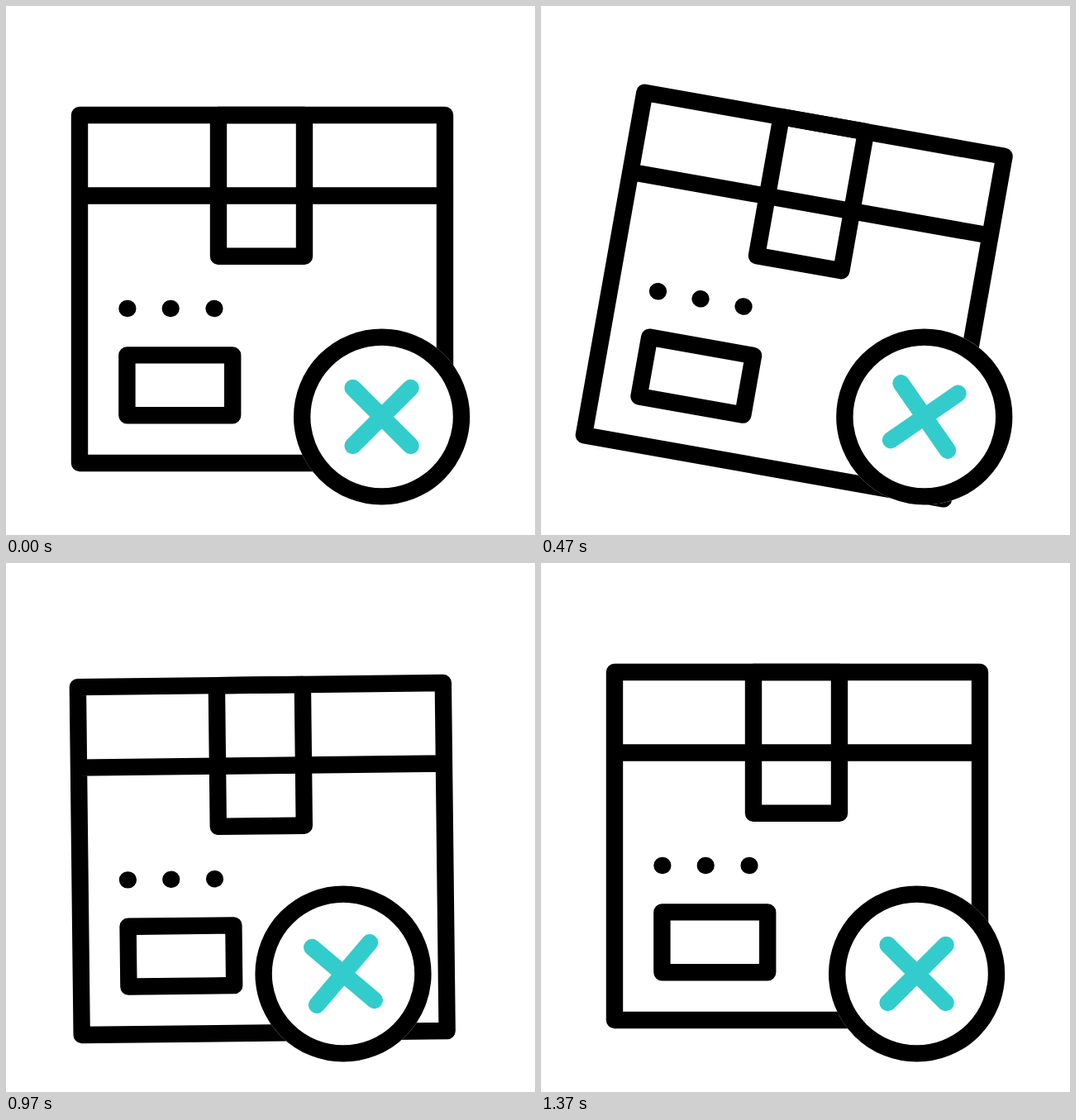
Recreate the animation shown at these times as an HTML page. Size 640 by 640 pixels, loop 1670 ms.

```html
<!DOCTYPE html>
<html lang="en">
<head>
<meta charset="utf-8">
<title>Cancelled parcel</title>
<style>
  html, body { margin: 0; width: 100%; height: 100%; overflow: hidden; background: #fff; }
  svg { display: block; width: 100vw; height: 100vh; }
  g { fill: none; stroke: #000; stroke-width: 20.4; stroke-linecap: round; stroke-linejoin: round; }
  #cross { stroke: #33cccc; }
</style>
</head>
<body>
<svg viewBox="0 0 640 640">
  <g id="box">
    <path d="M89 132H531V553H89ZM89 229.5H531"/>
    <path d="M257 132H361V302.7H257Z"/>
    <path d="M146.4 422.4H274.2V495.2H146.4Z"/>
    <path d="M146.5 366h.8m51.5 0h.8m52 0h.8"/>
  </g>
  <g id="badge">
    <circle r="106.6" fill="#fff" stroke="none"/>
    <circle r="96.4"/>
    <path id="cross" d="M-35 -35L35 35M-35 35L35 -35"/>
  </g>
</svg>
<script>
const LOOP = 1670, STEP = 100 / 3;
const START = 4, END = 41; // moving part of the loop, in steps
const [box, badge, cross] = ['box', 'badge', 'cross'].map(id => document.getElementById(id));

const smooth = u => u * u * (3 - 2 * u);
const part = (n, from, to) => Math.min(1, Math.max(0, (n - from) / (to - from)));
const ramp = (n, from, to) => smooth(part(n, from, to));

// Bezier ease with handles (a,0) and (b,1)
function ease(u, a, b) {
  let lo = 0, hi = 1;
  for (let i = 0; i < 24; i++) {
    const s = (lo + hi) / 2, r = 1 - s;
    if (3 * r * s * (r * a + s * b) + s * s * s < u) lo = s; else hi = s;
  }
  return smooth(lo);
}

// Swings through evenly spaced peaks and comes back to rest
function swing(n, first, gap, peaks) {
  let value = 0, from = START;
  [...peaks, 0].forEach((peak, i) => {
    const to = i < peaks.length ? first + i * gap : END;
    value += (peak - value) * ramp(n, from, to);
    from = to;
  });
  return value;
}

// Each swing of the box is about half the one before, the other way
const tilts = [0, 1, 2].map(i => 11.6 * (-0.51) ** i);
const shakes = [45, -22, 43.3, -54, 34.5];

function draw(ms) {
  // 30 steps a second, each starting on a 10 ms tick
  const n = Math.floor((Math.floor(ms % LOOP / 10) * 10 + 3.4) / STEP);
  const drop = 19.4 * (ramp(n, 5, 22.5) - ramp(n, 24.5, 40));
  const tilt = swing(n, 12, 10.9, tilts);
  const shake = swing(n, 10.6, 6.5, shakes);
  const spin = 360 * ease(part(n, 11.9, 32), 0.4, 0.2);
  box.setAttribute('transform', `translate(0 ${drop}) rotate(${tilt} 320 320)`);
  badge.setAttribute('transform', `translate(${454.6 + shake} 497)`);
  cross.setAttribute('transform', `rotate(${spin})`);
}

const begin = performance.now();
function tick() {
  draw(performance.now() - begin);
  requestAnimationFrame(tick);
}
tick();
</script>
</body>
</html>
```
